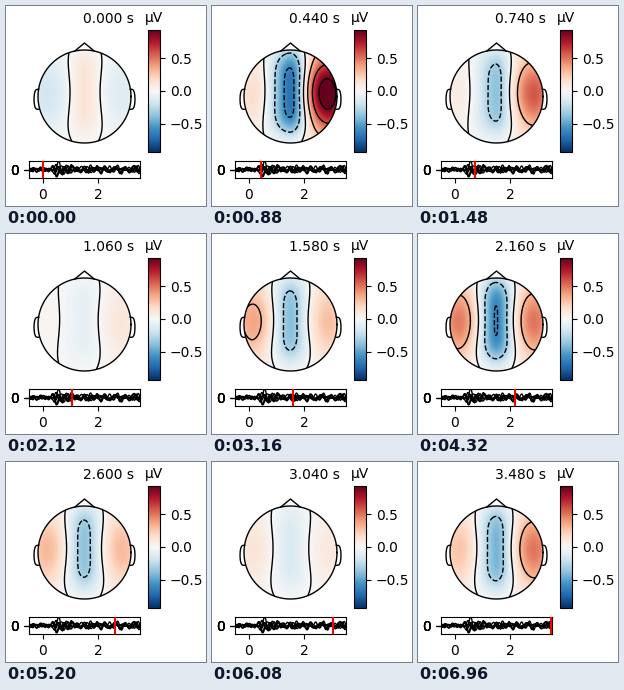
Animation, 200 px wide and 200 px high, one loop 7000 ms. Source, as a matplotlib script:

```python
import numpy as np
import matplotlib.pyplot as plt
from matplotlib.animation import FuncAnimation
from matplotlib.cm import ScalarMappable
from matplotlib.colors import Normalize
from matplotlib.patches import Circle

SIZE, DPI = 200, 100
FRAMES, INTERVAL = 175, 40
STEP = 0.02                      # seconds of signal per frame
VMAX = 0.925
LEVELS = np.arange(-3, 4) * 0.3
CX, CY, R = 78.5, 90.5, 46.5     # head in pixels

plt.rcParams.update({"font.family": "DejaVu Sans", "font.size": 10})

# time -> amplitude of the left, centre and right regions
POSES = {
    0.00: (-0.17, 0.12, -0.12),
    0.44: (0.15, -0.68, 1.05),
    1.06: (0.02, -0.08, 0.11),
    1.58: (0.37, -0.39, 0.28),
    2.16: (0.48, -0.61, 0.50),
    3.04: (0.12, -0.14, 0.09),
    3.48: (0.26, -0.43, 0.50),
}
TIMES = np.array(list(POSES))
AMPS = np.array(list(POSES.values()))
SWING = np.array([0.1, -0.1, 0.12])


def regions(t):
    """Eased amplitudes with a small swing between key times."""
    k = np.clip(np.searchsorted(TIMES, t + 1e-9, "right") - 1, 0, len(TIMES) - 2)
    s = np.clip((t - TIMES[k]) / (TIMES[k + 1] - TIMES[k]), 0, 1)
    ease = s * s * (3 - 2 * s)
    return AMPS[k] + ease * (AMPS[k + 1] - AMPS[k]) + np.sin(4 * np.pi * s) * SWING


def basis(x, y):
    """Spatial weight of the left, centre and right regions."""
    v = (y - 88) / 46
    d = np.abs(x - 78)
    band = np.sin(np.pi / 2 * np.clip(1 - d / (38 + 1.5 * v), 0, 1) ** 2)
    lobe = (1 - band) * np.exp(-(v / 0.85) ** 2 - (np.maximum(d - 37, 0) / 22) ** 2)
    centre = band * np.exp(-1.5 * (v + 0.03) ** 4)
    return np.array([lobe * (x < 78), centre, lobe * (x >= 78)])


gx, gy = np.meshgrid(np.arange(31, 127.0), np.arange(43, 139.0))
BASIS = basis(gx, gy)

fig = plt.figure(figsize=(SIZE / DPI, SIZE / DPI), dpi=DPI, facecolor="white")


def pixel_axes(x, y, w, h):
    return fig.add_axes([x / SIZE, 1 - (y + h) / SIZE, w / SIZE, h / SIZE])


# Head map
ax = pixel_axes(0, 0, SIZE, SIZE)
ax.set(xlim=(0, SIZE), ylim=(SIZE, 0))
ax.axis("off")
clip = Circle((CX, CY), R, transform=ax.transData)
image = ax.imshow(BASIS[0], cmap="RdBu_r", vmin=-VMAX, vmax=VMAX, aspect="auto",
                  extent=(30.5, 126.5, 138.5, 42.5), interpolation="bilinear")
image.set_clip_path(clip)


def outline(x, y):
    ax.plot(CX + R * np.asarray(x), CY - R * np.asarray(y), "k", lw=1, zorder=4)


ang = np.linspace(0, 2 * np.pi, 101)
outline(np.cos(ang), np.sin(ang))
outline([-0.209, 0, 0.209], [0.978, 1.15, 0.978])
half = np.linspace(-np.pi / 2, np.pi / 2, 41)
ear_x = 0.985 + 0.1 * np.sqrt(np.abs(np.cos(half)))
ear_y = -0.06 + 0.215 * np.sin(half)
outline(ear_x, ear_y)
outline(-ear_x, ear_y)
clock = ax.text(128, 17, "", ha="right", va="baseline")

# Colour bar
cax = pixel_axes(142, 24, 12, 122)
fig.colorbar(ScalarMappable(Normalize(-VMAX, VMAX), "RdBu_r"), cax=cax,
             ticks=[-0.5, 0, 0.5])
cax.set_title("µV", fontsize=10)

# Signal traces
lax = pixel_axes(23, 155, 111, 17)
rng = np.random.default_rng(4)
ts = np.linspace(-0.5, 3.5, 401)
envelope = 0.14 + 0.08 / (1 + np.exp(-(ts - 0.4) / 0.03)) + 0.3 * np.exp(-((ts - 0.62) / 0.2) ** 2)
for _ in range(6):
    freqs = rng.uniform(0.8, 4.5, 4)
    phases = rng.uniform(0, 2 * np.pi, 4)
    wave = np.sin(2 * np.pi * np.outer(ts, freqs) + phases).sum(axis=1) / np.sqrt(2)
    lax.plot(ts, envelope * wave, "k", lw=1)
lax.set(xlim=(-0.5, 3.5), ylim=(-1.05, 1.05), xticks=[0, 2])
lax.set_yticks([0] * 4, ["0"] * 4)
cursor = lax.axvline(0, color="r", lw=1.5, zorder=5)

lines = []


def update(i):
    t = i * STEP
    z = np.tensordot(regions(t), BASIS, 1)
    image.set_data(z)
    while lines:
        lines.pop().remove()
    cs = ax.contour(gx, gy, z, levels=LEVELS, colors="k", linewidths=1)
    cs.set_clip_path(clip)
    lines.append(cs)
    clock.set_text(f"{t:.3f} s")
    cursor.set_xdata([t, t])
    return image, clock, cursor


anim = FuncAnimation(fig, update, frames=FRAMES, interval=INTERVAL,
                     repeat=True, repeat_delay=0, blit=False)
plt.show()
```
